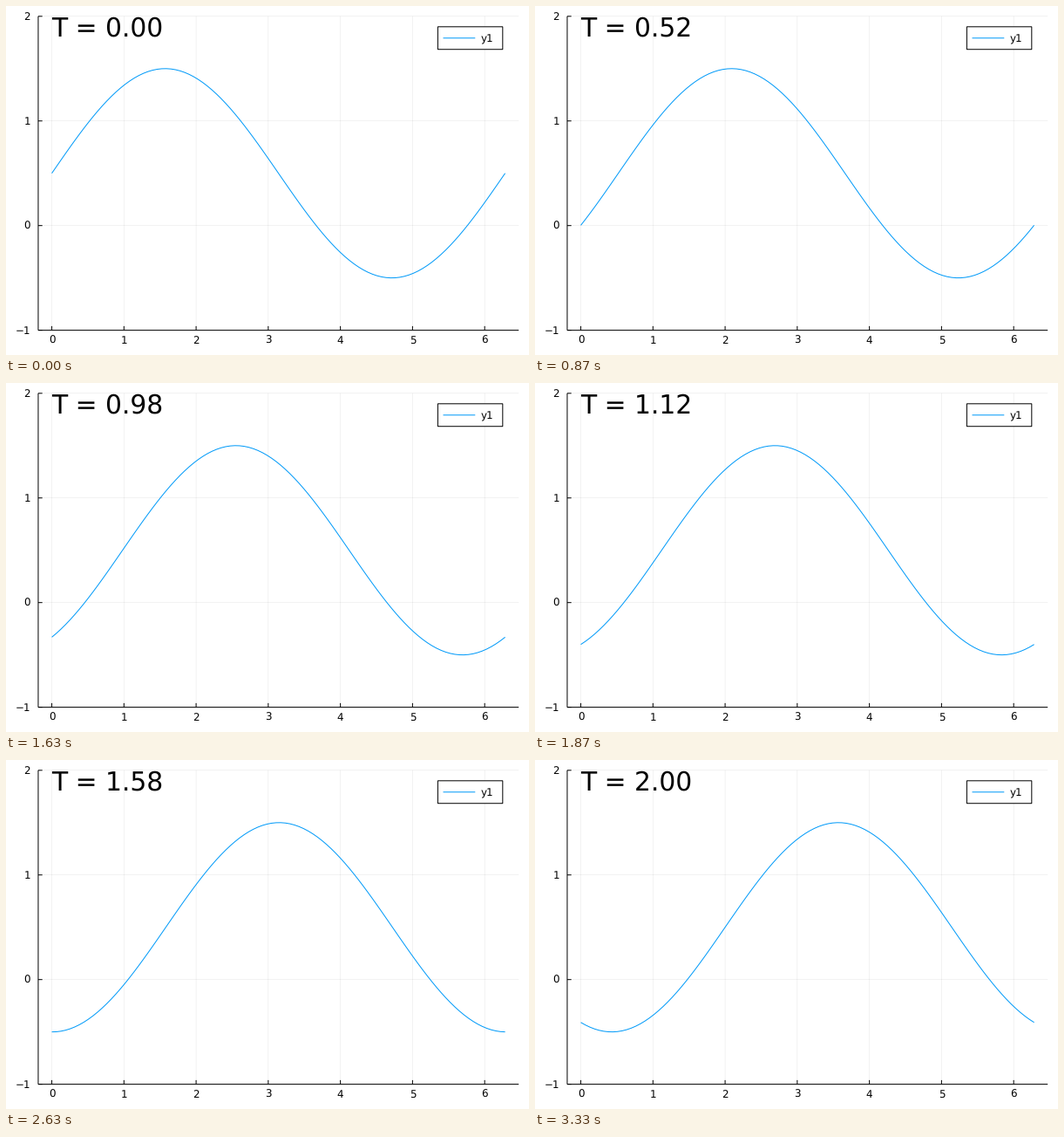
Animation of 600 by 400 pixels, one loop 3360 ms. Source, as a matplotlib script:

```python
import matplotlib.pyplot as plt
import numpy as np
from matplotlib.animation import FuncAnimation
from matplotlib.patches import Rectangle

W, H, DPI = 600, 400, 100
LOOP_MS, STEPS = 3360, 101
PT = 72 / DPI  # one pixel in points

plt.rcParams.update({
    "font.family": "DejaVu Sans",
    "text.hinting": "none",
    "lines.solid_capstyle": "butt",
    "path.simplify": False,
})

# Plot area in pixels, y pointing down
LEFT, RIGHT, TOP, BOTTOM = 36.96, 588.19, 11.81, 371.61
X_MAX = 2 * np.pi
MARGIN = 0.03 * X_MAX
TICK = 4.72
SMALL, LARGE = 11.85, 29.8
CAP = 0.729  # digit height relative to the font size
BLUE = "#009AF9"

fig = plt.figure(figsize=(W / DPI, H / DPI), dpi=DPI, facecolor="white")
ax = fig.add_axes([0, 0, 1, 1])
ax.set_xlim(0, W)
ax.set_ylim(H, 0)
ax.axis("off")


def px(x):
    return LEFT + (x + MARGIN) / (X_MAX + 2 * MARGIN) * (RIGHT - LEFT)


def py(y):
    return BOTTOM - (y + 1) / 3 * (BOTTOM - TOP)


def line(xs, ys, color="black", width=1.0, **kw):
    return ax.plot(xs, ys, color=color, lw=width * PT, snap=False, **kw)[0]


def label(x, y, text, size=SMALL, ha="left"):
    """Text whose digits are centred vertically on y."""
    return ax.text(x, y + CAP * size / 2, text, fontsize=size * PT,
                   ha=ha, va="baseline", color="black")


def draw_axes():
    for x in range(7):
        line([px(x)] * 2, [TOP, BOTTOM], width=0.5, alpha=0.1)
    for y in range(-1, 3):
        line([LEFT, RIGHT], [py(y)] * 2, width=0.5, alpha=0.1)

    line([LEFT, RIGHT], [BOTTOM, BOTTOM])
    line([LEFT, LEFT], [BOTTOM, TOP])

    for x in range(7):
        line([px(x)] * 2, [BOTTOM, BOTTOM - TICK])
        label(px(x), 382.9, str(x), ha="center")
    for y in range(-1, 3):
        line([LEFT, LEFT + TICK], [py(y)] * 2)
        label(LEFT - 9, py(y), str(y).replace("-", "\u2212"), ha="right")


def draw_legend():
    left, right, top, bottom = 495.4, 569.81, 23.8, 49.72
    mid = (top + bottom) / 2
    ax.add_patch(Rectangle((left, top), right - left, bottom - top,
                           facecolor="white", edgecolor="black",
                           lw=PT, snap=False, zorder=4))
    line([left + 6.12, left + 42.87], [mid, mid], BLUE, zorder=5)
    label(left + 49, mid, "y1").set_zorder(5)


draw_axes()
xs = np.linspace(0, X_MAX, 100)
wave = line(px(xs), py(np.sin(xs) + 0.5), BLUE, zorder=3,
            solid_joinstyle="round")
clock = label(px(0), py(1.9), "", LARGE)
draw_legend()


def update(i):
    t = 0.02 * i
    wave.set_ydata(py(np.sin(xs - t) + 0.5))
    clock.set_text(f"T = {t:.2f}")
    return wave, clock


anim = FuncAnimation(fig, update, frames=STEPS, interval=LOOP_MS / STEPS,
                     repeat=True, repeat_delay=0)
plt.show()
```
